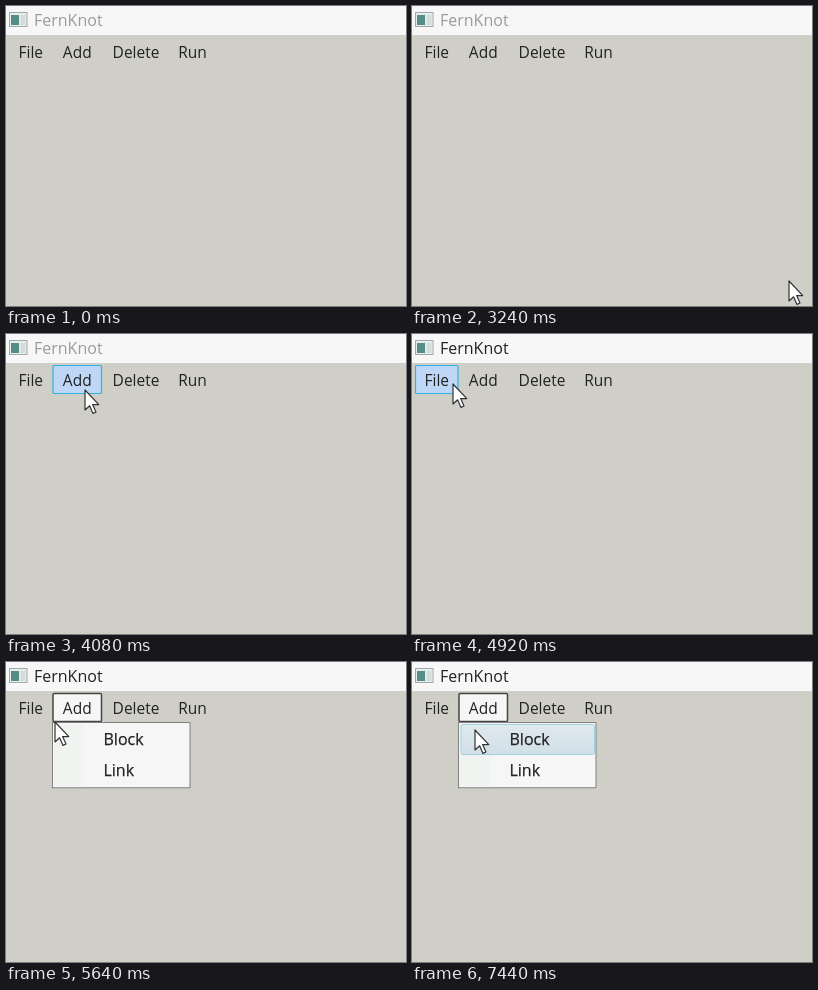
These frames come from a looping animation (400 by 300 pixels, 8000 ms). An HTML page:

```html
<!DOCTYPE html>
<html lang="en">
<head>
<meta charset="utf-8">
<title>Menu</title>
<style>
  html, body { margin: 0; width: 100%; height: 100%; overflow: hidden; background: #d0cfc7; }
  svg { display: block; width: 400px; height: 300px; }
  text { font: 15.5px "Open Sans", "Noto Sans", sans-serif; fill: #222; }
  #caption { font-size: 16px; }
  .drop { visibility: hidden; }
  .drop text { font-size: 16px; stroke: #222; stroke-width: .25px; }
  .drop.open { visibility: visible; }
  .tab { fill: none; stroke: none; }
  .tab.hover { fill: #bfd7f6; stroke: #2fb2e0; stroke-width: 1.2px; }
  .tab.open { fill: #f6f6f6; stroke: #444; stroke-width: 1.5px; }
  .tab + text { text-anchor: middle; }
</style>
</head>
<body>
<svg viewBox="0 0 400 300">
  <defs>
    <pattern id="hatch" width="4" height="4" patternUnits="userSpaceOnUse">
      <rect width="4" height="4" fill="#f3f5f3"/>
      <path d="M-1 1L1 -1M0 4L4 0M3 5L5 3" stroke="#eaf0ec"/>
    </pattern>
    <linearGradient id="glow" x2="0" y2="1">
      <stop stop-color="#e0e9ee"/>
      <stop offset="1" stop-color="#d0dfe8"/>
    </linearGradient>
  </defs>
  <rect width="400" height="300" fill="#d0cfc7"/>
  <rect width="400" height="29" fill="#f7f7f7"/>
  <g id="icon">
    <rect x="3.5" y="6.5" width="17.5" height="14" fill="#e9ecec" stroke="#a3aaac"/>
    <rect x="5" y="9" width="8" height="10" fill="#558d86"/>
    <rect x="14.5" y="9" width="5" height="10" fill="#d6dbdc"/>
  </g>
  <text id="caption" x="28" y="20">FernKnot</text>
  <g id="bar"></g>
  <g id="drops"></g>
  <path id="cursor" d="M0 0V20L4.6 15.8L8 23.4L11 22L7.6 14.6H13.8Z"
        fill="#fff" stroke="#333" stroke-width="1.2" stroke-linejoin="round"/>
</svg>
<script>
const LOOP = 8000, STEP = 120, ROW = 31.25;
const SHOWN = 3240, ACTIVE = 4920, CLICK = 5040;

const menus = [
  { label: "File", width: 43.5, dropWidth: 152, items: ["New", "Load", "Save", "Save as", "Exit"] },
  { label: "Add", width: 49.5, dropWidth: 137.5, items: ["Block", "Link"] },
  { label: "Delete", width: 68 },
  { label: "Run", width: 45 }
];

// Places where the pointer rests or turns
const path = [
  { t: SHOWN, x: 377, y: 275 },
  { t: 4080, x: 79, y: 56 },
  { t: ACTIVE, x: 41, y: 50 },
  { t: 5400, x: 41, y: 50 },
  { t: 5640, x: 49, y: 60 },
  { t: 5760, x: 63, y: 68 },
  { t: LOOP, x: 63, y: 68 }
];

const byId = id => document.getElementById(id);

function add(parent, tag, attrs, text = "") {
  const el = document.createElementNS("http://www.w3.org/2000/svg", tag);
  for (const key in attrs) el.setAttribute(key, attrs[key]);
  el.textContent = text;
  return parent.appendChild(el);
}

function addDrop(menu) {
  const left = Math.floor(menu.x) + .5, height = menu.items.length * ROW + 2.75;
  const drop = add(byId("drops"), "g", { class: "drop" });
  add(drop, "rect", { x: left, y: 60.5, width: menu.dropWidth, height, fill: "#f6f6f6", stroke: "#808080" });
  add(drop, "rect", { x: left + 1.5, y: 62, width: 30, height: height - 3, fill: "url(#hatch)" });
  menu.glow = add(drop, "rect", {
    x: left + 2.5, y: 62.5, width: menu.dropWidth - 4, height: 30, rx: 2, fill: "url(#glow)", stroke: "#a3cede"
  });
  menu.items.forEach((item, i) => add(drop, "text", { x: left + 51, y: 82.5 + i * ROW }, item));
  menu.drop = drop;
}

let edge = 3;
for (const m of menus) {
  m.x = edge;
  edge += m.width;
  m.tab = add(byId("bar"), "rect", { class: "tab", x: m.x + .5, y: 31.5, width: m.width - 1, height: 28, rx: 1 });
  add(byId("bar"), "text", { x: m.x + m.width / 2, y: 51.5 }, m.label);
  if (m.items) addDrop(m);
}

function pointerAt(t) {
  const i = path.findLastIndex(p => p.t <= t);
  const a = path[i], b = path[i + 1];
  const k = (t - a.t) / (b.t - a.t), ease = k * k * (3 - 2 * k);
  return { x: a.x + (b.x - a.x) * ease, y: a.y + (b.y - a.y) * ease };
}

function draw(time) {
  const t = Math.floor(time / STEP) * STEP;
  const shown = t >= SHOWN, clicked = t >= CLICK;
  const { x, y } = pointerAt(Math.max(t, SHOWN));
  const cursor = byId("cursor");
  cursor.style.visibility = shown ? "visible" : "hidden";
  cursor.setAttribute("transform", `translate(${Math.round(x)} ${Math.round(y)})`);
  byId("caption").style.fill = t < ACTIVE ? "#9a9b9e" : "#222";
  for (const m of menus) {
    const under = shown && x >= m.x && x < m.x + m.width;
    m.tab.classList.toggle("open", clicked && under);
    m.tab.classList.toggle("hover", !clicked && under && y > 31 && y < 60);
    if (!m.drop) continue;
    m.drop.classList.toggle("open", clicked && under);
    m.glow.style.display = y > 62 ? "" : "none";
  }
}

const start = performance.now();
function tick() {
  draw((performance.now() - start) % LOOP);
  requestAnimationFrame(tick);
}
tick();
</script>
</body>
</html>
```
